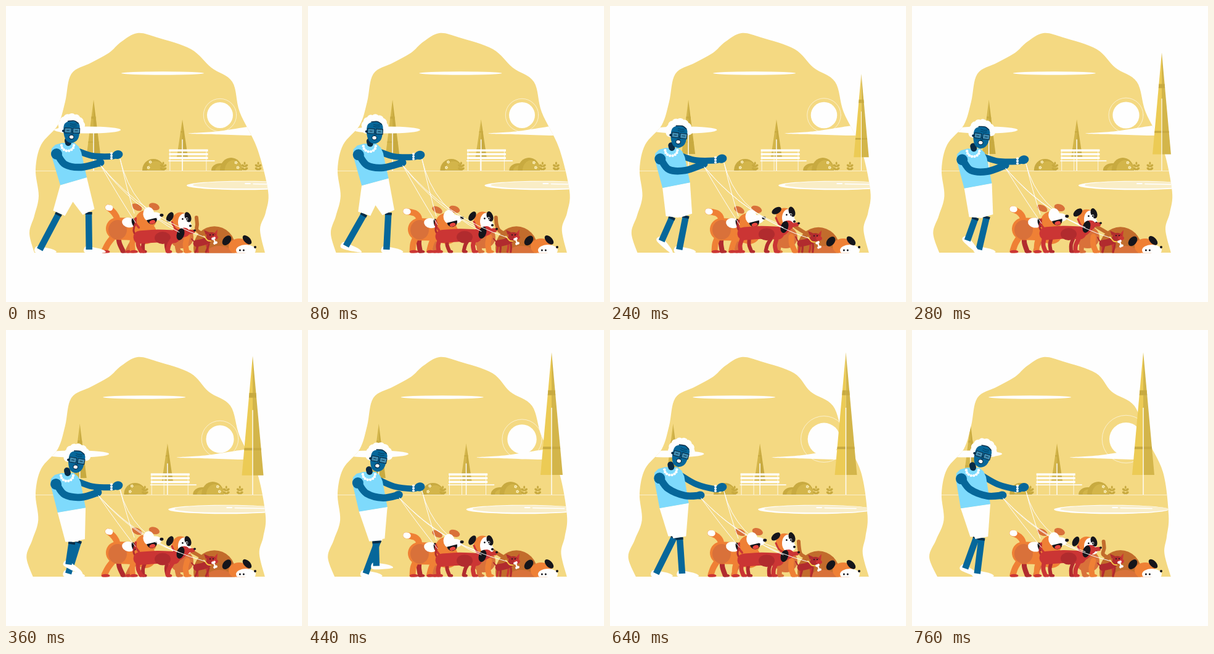
Animation of 480x480 px, one loop 0.8 s. Source, as an HTML page with a canvas:

```html
<!DOCTYPE html>
<html lang="en">
<head>
<meta charset="utf-8">
<title>Dog walk</title>
<style>
html, body { margin: 0; width: 100%; height: 100%; overflow: hidden; background: #fefefe; }
canvas { display: block; width: 480px; height: 480px; }
</style>
</head>
<body>
<canvas id="stage" width="480" height="480"></canvas>
<script>
const g = document.getElementById('stage').getContext('2d');
const LOOP = 800, STEP = 40, STRIDE = 640, GROUND = 400.5, HORIZON = 267;
const TAU = Math.PI * 2;
const C = {
  paper: '#fefefe', sand: '#f4d982', gold: '#eccb55', amber: '#d3b54a', olive: '#c8aa40',
  skin: '#06679a', navy: '#072c47', shirt: '#7edafc',
  orange: '#ef8035', rust: '#d9713a', brown: '#c26c2c',
  red: '#cb3534', wine: '#b12b2e', black: '#15151b', yellow: '#f6c945'
};

// ---- timing helpers ----
const clamp = u => Math.max(0, Math.min(1, u));
const lerp = (a, b, u) => a + (b - a) * u;
const wave = (t, period, shift = 0) => Math.cos(TAU * (t + shift) / period);
function ease(u) { u = clamp(u); return u * u * (3 - 2 * u); }

// ---- drawing helpers ----
function trace(p, closed) {
  const n = p.length;
  const at = i => closed ? p[(i + n) % n] : p[Math.max(0, Math.min(n - 1, i))];
  g.beginPath();
  g.moveTo(...p[0]);
  for (let i = 0; i < (closed ? n : n - 1); i++) {
    const a = at(i - 1), b = at(i), c = at(i + 1), d = at(i + 2);
    g.bezierCurveTo(b[0] + (c[0] - a[0]) / 6, b[1] + (c[1] - a[1]) / 6,
      c[0] - (d[0] - b[0]) / 6, c[1] - (d[1] - b[1]) / 6, c[0], c[1]);
  }
}
function paint(color) { g.fillStyle = color; g.fill(); }
function outline(width, color, cap = 'round') {
  g.lineWidth = width; g.lineCap = cap; g.lineJoin = 'round'; g.strokeStyle = color;
  g.stroke();
}
function shape(p, color) { trace(p, true); paint(color); }
function stroke(p, width, color, cap) { trace(p); outline(width, color, cap); }
function poly(p, color) {
  g.beginPath();
  p.forEach(q => g.lineTo(...q));
  g.closePath();
  paint(color);
}
function oval(x, y, rx, ry, color, deg = 0) {
  g.beginPath();
  g.ellipse(x, y, rx, ry, deg * TAU / 360, 0, TAU);
  paint(color);
}
const dot = (x, y, r, color) => oval(x, y, r, r, color);
function rect(x, y, w, h, color) { g.fillStyle = color; g.fillRect(x, y, w, h); }
function placed(x, y, deg, draw) {
  g.save();
  g.translate(x, y);
  g.rotate(deg * TAU / 360);
  draw();
  g.restore();
}

// ---- landscape ----
const HILL = [
  [46, 400], [38, 368], [46, 340], [53, 308], [48, 265], [57, 225], [84, 193], [96, 155],
  [106, 110], [138, 92], [167, 76], [187, 58], [213, 44], [245, 51], [300, 70], [333, 100],
  [367, 123], [379, 172], [407, 230], [425, 300], [421, 335], [412, 362], [420, 400]
];
const DRIFT_CENTRES = [[345, 105], [425, 315], [38, 365]];

// The outline slides left around three soft centres.
function hill(u) {
  return HILL.map(([x, y]) => {
    const pull = DRIFT_CENTRES.reduce((sum, [cx, cy]) =>
      sum + Math.exp(-((x - cx) ** 2 + (y - cy) ** 2) / 1800), 0);
    return [x - 10 * u * pull, y];
  });
}

function tree(x, height, half, base, light, dark, scale = 1) {
  g.save();
  g.translate(x, HORIZON);
  g.scale(scale, scale);
  const slice = (from, to, side, color) => {
    const y = u => lerp(-height, -base, u);
    poly([[0, y(from)], [side * half * from, y(from)], [side * half * to, y(to)], [0, y(to)]], color);
  };
  for (const [side, color] of [[-1, light], [1, dark]]) {
    slice(0, 1, side, color);
    slice(.31, .35, side, C.olive);
    slice(.77, .79, side, C.olive);
  }
  rect(-.7, -height * .61, 1.4, height * .61, C.paper);
  g.restore();
}

function shrub(x) {
  for (const side of [-1, 1])
    for (const y of [264, 259]) oval(x + 2.5 * side, y, 3.2, 1.8, C.olive, -35 * side);
  oval(x, 255, 1.5, 2.5, C.olive);
}

function flower(x, y) {
  for (let a = 0; a < TAU; a += TAU / 5) dot(x + 1.6 * Math.cos(a), y + 1.6 * Math.sin(a), 1, '#fff3c4');
}

function bush(x, rx, ry) {
  g.save();
  g.beginPath(); g.rect(0, 0, 480, HORIZON); g.clip();
  oval(x, HORIZON - 1, rx, ry, C.olive);
  oval(x + rx * .2, HORIZON, rx * .78, ry * .85, C.amber);
  g.restore();
}

function bench(x) {
  for (let i = 0; i < 3; i++) rect(x, 232.4 + 6.1 * i, 63, 3.6, C.paper);
  rect(x - 1, 250.3, 75, 1.6, C.paper);
  for (const dx of [1, 21, 60]) rect(x + dx, 236, .8, 31, C.paper);
}

function landscape(t) {
  const pan = -.0826 * t, far = -.0525 * t, glow = ease((t - 160) / 600);
  g.save();
  trace(hill(t / 760));
  g.closePath();
  paint(C.sand);
  g.clip();

  oval(254 + pan, 109, 67, 2.8, C.paper);
  dot(347, 177, 21 + 6 * glow, C.paper);
  g.beginPath(); g.arc(347, 177, 26.7 + 12 * glow, 0, TAU);
  outline(.6, C.paper);

  tree(142 - .062 * t, 115, 11, 27, C.amber, C.olive);
  tree(286 - .067 * t, 83, 9, 22, C.amber, C.olive);
  oval(132 + far, 201, 54, 5.6, C.paper);
  shape([[296 + far, 206.8], [345 + far, 203], [420 + far, 193], [420 + far, 209], [345 + far, 208.3]], C.paper);

  bush(239 + pan, 18, 18);
  bush(348 + pan, 15, 11);
  bush(365 + pan, 18, 20);
  for (const [x, y] of [[231, 262], [234, 253], [373, 254], [376, 262]]) flower(x + pan, y);
  for (const x of [255, 387, 409]) shrub(x + pan);
  bench(264.5 + pan);
  rect(0, HORIZON, 480, .6, C.paper);

  oval(386 + pan, 291, 93, 7.3, C.paper);
  oval(391 + pan, 290.3, 88, 5.8, '#f9edc6');
  stroke([[388 + pan, 288], [396 + pan, 288]], 1.8, C.paper);
  stroke([[401 + pan, 288.5], [452 + pan, 289.5]], 1.5, C.paper);
  g.restore();

  const grow = clamp((t - 142) / 310);
  if (grow > 0) tree(422.5 - .0625 * t, 231, 18, 32, C.gold, C.amber, 1 - (1 - grow) ** 3);
}

// ---- dogs ----
const trot = t => wave(t, 360, 20);
const nod = t => wave(t, 360, -30);

function leg(x, y, foot, width, color, toe = color) {
  stroke([[x, y], [(x + foot) / 2 - 2, (y + 398) / 2], [foot, 397]], width, color);
  oval(foot + 2, 398.5, width * .7, 2.8, toe);
}
function eyes(x, y, gap, r) {
  for (const dx of [0, gap]) {
    dot(x + dx, y, r * 1.7, C.paper);
    dot(x + dx + .4, y, r, C.black);
  }
}

function sniffer(t) {
  const c = nod(t), tip = 303 + 9 * wave(t, 900, 100);
  stroke([[324, 372], [310, 364], [tip, 354], [tip - 1, 343]], 6, C.brown);
  oval(338, 392, 34, 34 + c, C.brown);
  oval(346, 403, 22, 14, C.rust);
  oval(378, 390, 17, 13, C.orange);
  oval(389, 396, 16, 9, C.paper);
  oval(358, 381 - c, 6, 9, C.black, 40);
  oval(391, 380 - c, 9, 5, C.black, 45);
  dot(404, 391, 2, C.black);
  eyes(379, 396, 6, 1.5);
}

function beagle(t) {
  const c = nod(t);
  oval(285, 375, 19, 18, C.rust);
  leg(280, 378, 276 + 4 * c, 8, C.rust);
  leg(294, 374, 296 - 4 * c, 9, C.orange);
  placed(283, 345 + 4 * c, 0, () => {
    oval(0, 1, 14, 15, C.orange);
    oval(6, 2, 10, 14, C.paper);
    oval(11, 8, 7, 7, C.paper);
    oval(-15 - 2.5 * c, -8 + 2 * c, 5, 8.5, C.black, 45 - 18 * c);
    oval(12, -7 + c, 5, 8.5, C.black, -20);
    eyes(3, -3, 7, 1.4);
    dot(16, 8, 2, C.black);
    stroke([[-14, 2], [-9, 12], [-2, 16]], 3, C.red);
  });
}

function shaggy(t) {
  const c = trot(t), tip = [160 + 6 * c, 332 - 5.5 * c];
  stroke([[176, 358], [180, 345], [174, 336 - 2 * c], tip], 10, C.orange);
  stroke([[tip[0] + 3, tip[1] + .5], tip], 9.5, C.paper);
  leg(182, 370, 183 + 7 * c, 8, C.wine);
  leg(214, 372, 204 - 7 * c, 8, C.rust, C.red);
  stroke([[180, 362 - c], [205, 363 - c], [226, 368]], 36, C.orange);
  leg(176, 372, 168 - 9 * c, 10, C.orange, C.red);
  leg(208, 370, 198 + 8 * c, 9, C.orange, C.red);
  oval(181, 363, 15, 16, C.rust);
  oval(199, 352 - c, 11, 8, C.paper, 10);
  oval(207, 352 - c, 3, 7, C.black, -15);
  placed(226 + 2.5 * c, 348 - 4 * c, 0, () => {
    oval(-1, 2, 17, 15, C.orange);
    oval(-16, -18, 9, 5, C.rust, 28);
    oval(12, -19, 9, 5.5, C.rust, 20);
    oval(3, -7, 9, 11, C.paper);
    oval(13, -3, 11, 7, C.paper);
    g.beginPath(); g.arc(8, 1, 8.5, -.25, Math.PI - .25); g.closePath(); paint(C.black);
    oval(9, 6, 5, 3, '#e9463f', -15);
    oval(24, -5, 3, 2.4, C.black);
    stroke([[-18, 0], [-18, 8], [-13, 15]], 3.5, C.red);
  });
}

function dachshund(t) {
  const d = wave(t, 540), c = trot(t), back = 371 + 3 * d, headY = 361 + 6 * d;
  stroke([[212, back], [207, back - 9], [209, back - 20]], 3, C.wine);
  leg(226, 376, 228 - 6 * c, 6, C.wine);
  leg(262, 376, 254 + 8 * c, 6, C.wine);
  stroke([[217, back + 1], [245, back - 1], [272, back]], 21, C.red);
  stroke([[270, back], [280, back - 3], [290, headY]], 14, C.red);
  oval(254, back + 2, 13, 10, C.wine);
  leg(214, 378, 213 + 6 * c, 7, C.red);
  leg(270, 378, 268 - 6 * c, 7, C.red);
  placed(292, headY, 0, () => {
    oval(-3, 0, 9, 7.5, C.red);
    stroke([[0, 0], [11, -1]], 6.5, C.red);
    oval(14, -3, 2, 1.8, C.black);
    oval(-9, 3, 6, 10, C.black, 18);
  });
}

function tiny(t) {
  const c = nod(t), s = trot(t), boneY = 383.5 - 4 * c;
  stroke([[305, 382], [301, 376 + 2 * c]], 2, C.wine);
  for (const x of [308, 325])
    for (const k of [1, -1]) {
      const hip = x + 2 - 2 * k;
      stroke([[hip, 386], [hip + 2 * k * s, 392], [hip - 1 + 4 * k * s, 399]], 3.2, k > 0 ? C.red : C.wine);
    }
  stroke([[309, 385], [319, 383], [327, 380]], 11, C.wine);
  placed(333, 373 - c, 0, () => {
    poly([[-9, -1], [-12, -9], [-3, -5]], C.wine);
    poly([[4, -3], [10, -10], [9, 0]], C.red);
    oval(0, 1, 8, 6.5, C.wine);
    oval(6, 3, 5, 3.8, C.red);
    for (const x of [-2, 3]) dot(x, -1, 1, C.black);
    stroke([[-12, 1], [-6, 8], [-1, 9]], 2, C.yellow);
  });
  placed(338, boneY + .5, -22, () => {
    rect(-1.2, -4, 2.4, 8, C.paper);
    for (const x of [-1.5, 1.5]) for (const y of [-4, 4]) dot(x, y, 2, C.paper);
  });
}

// ---- walker ----
// A foot starts at x, swings forward by one stride and is carried back while it bears weight.
function foot(x, swing, stance) {
  const air = Math.sin(Math.PI * swing);
  return {
    at: [x + 64 * ease(swing * 1.03 + .1) - 60 * stance, 395 - 15 * air],
    tilt: 30 * Math.sin(TAU * swing ** 1.5) + 12 * air
  };
}

function shin(hem, { at, tilt }) {
  const len = Math.hypot(at[0] - hem[0], at[1] - hem[1]);
  const bandEnd = hem.map((v, i) => lerp(v, at[i], 4 / len));
  placed(...at, tilt, () => shape([[-6, -5], [-6, 5], [25, 5], [22, 0], [5, -4]], C.paper));
  stroke([hem, at], 10.5, C.skin, 'butt');
  stroke([hem, bandEnd], 11, C.navy, 'butt');
}

function thigh(waistL, waistR, hem) {
  const dx = hem[0] - (waistL[0] + waistR[0]) / 2, dy = hem[1] - (waistL[1] + waistR[1]) / 2;
  const k = 10.5 / Math.hypot(dx, dy);
  poly([waistL, waistR, [hem[0] + dy * k, hem[1] - dx * k], [hem[0] - dy * k, hem[1] + dx * k]], C.paper);
}

function head() {
  for (let i = 0; i < 8; i++) {
    const a = Math.PI * (.9 + i * .15);
    dot(-1 + 15 * Math.cos(a), -7 + 14 * Math.sin(a), 7, C.paper);
  }
  shape([[-13, -9], [-5, -15], [6, -15], [12, -9], [12, 6], [9, 15], [1, 20], [-8, 17], [-13, 6]], C.skin);
  stroke([[-7, -15], [3, -16], [10, -12]], 1.4, C.navy);
  dot(-14, 1, 2, C.navy);
  for (const y of [-11, -8]) stroke([[-3, y], [2, y + .8], [7, y]], .7, C.navy);
  for (const x of [-6.5, 7]) {
    rect(x - 5.5, -4, 11, 8, 'rgba(155,200,215,.4)');
    g.beginPath(); g.rect(x - 5.5, -4, 11, 8);
    outline(1.1, C.navy);
    stroke([[x - 2, 0], [x + 2, 0]], 1, C.navy);
  }
  stroke([[0, 1], [2, 5], [-1, 6]], .8, C.navy);
  oval(-.5, 10.5, 4.4, 4, C.navy);
  oval(-.5, 10.5, 3.3, 2.7, C.paper);
}

function necklace(x, y) {
  for (let a = 0; a <= Math.PI + .01; a += Math.PI / 7)
    dot(x + 10 * Math.cos(a), y + 9 * Math.sin(a), 2.2, C.paper);
}

function walker(t) {
  const u = t / 760, p = clamp(t / STRIDE), q = Math.max(0, t - STRIDE) / STRIDE;
  const bob = 5 * (1 - wave(t, 680));
  const neck = [99 - 2 * u, 222 + bob];
  const waistL = [88 - 9 * u, 290.5 - 2 * u + .65 * bob];
  const waistR = [131 - 4 * u, 278 + 3 * u + .9 * bob];
  const lower = ease((t - 160) / 320);
  const near = [153 - 6 * lower, 254 + 14 * lower];
  const far = [181, 241 + 14 * ease(t / 500)];
  const hemA = [lerp(86, 113, Math.sin(p * Math.PI / 2)), 336 + .75 * bob];
  const hemB = [lerp(134, 105, p), 334 + .75 * bob];
  const off = (dx, dy) => [neck[0] + dx, neck[1] + dy];

  stroke([off(17, 13), [140, (neck[1] + 13 + far[1]) / 2 + 5], [170, far[1] + 3], [178, far[1] + 1]], 10, C.skin);
  oval(...far, 8.5, 7, C.skin, -12);
  for (const dy of [-2, 2, 6]) dot(171, far[1] + dy, 2, C.paper);

  shin(hemB, foot(133, q, p));
  shin(hemA, foot(53, p, q));
  thigh(waistL, waistR, hemB);
  thigh(waistL, waistR, hemA);

  poly([off(-19, 3), off(-8, 0), off(12, 0), off(19, 6), off(23, 15), waistR, waistL, off(-26, 18), off(-25, 9)], C.shirt);
  stroke([off(1, -4), off(2, 0)], 10, C.navy);
  necklace(neck[0] + 1, neck[1] + 4);
  placed(107 + 8 * clamp(t / 360), 202 + bob, 2 + 16 * u, head);

  dot(...off(-17, 18), 9, C.skin);
  stroke([off(-16, 18), off(-3, 35), [122, (near[1] + neck[1] + 47) / 2], near], 11.5, C.skin);
  oval(near[0] - 1, near[1], 7.5, 6.5, C.skin, -8);
  return { near, far };
}

function leash([x0, y0], [x1, y1], dx, dy) {
  g.beginPath();
  g.moveTo(x0, y0);
  g.quadraticCurveTo((x0 + x1) / 2 + dx, (y0 + y1) / 2 + dy, x1, y1);
  outline(1, C.paper);
}

function leashes(t, { near, far }) {
  const c = trot(t), n = nod(t);
  const a = [near[0] + 1, near[1] + 5], b = [far[0] + 4, far[1] + 7];
  leash(b, [208, 340 - 4 * c], 0, 6);
  leash(a, [210, 354 - 3 * c], 0, 3);
  leash(a, [271, 355 + 3 * n], -6, 18);
  leash(b, [281, 363 + 4 * wave(t, 540)], -30, 22);
  leash(a, [323, 376 - n], -14, 26);
}

function render(t) {
  rect(0, 0, 480, 480, C.paper);
  g.save();
  g.beginPath(); g.rect(0, 0, 480, GROUND); g.clip();
  landscape(t);
  for (const dog of [sniffer, beagle, shaggy, dachshund, tiny]) dog(t);
  leashes(t, walker(t));
  g.restore();
}

function tick() {
  render(Math.floor(performance.now() % LOOP / STEP) * STEP);
  requestAnimationFrame(tick);
}
tick();
</script>
</body>
</html>
```
